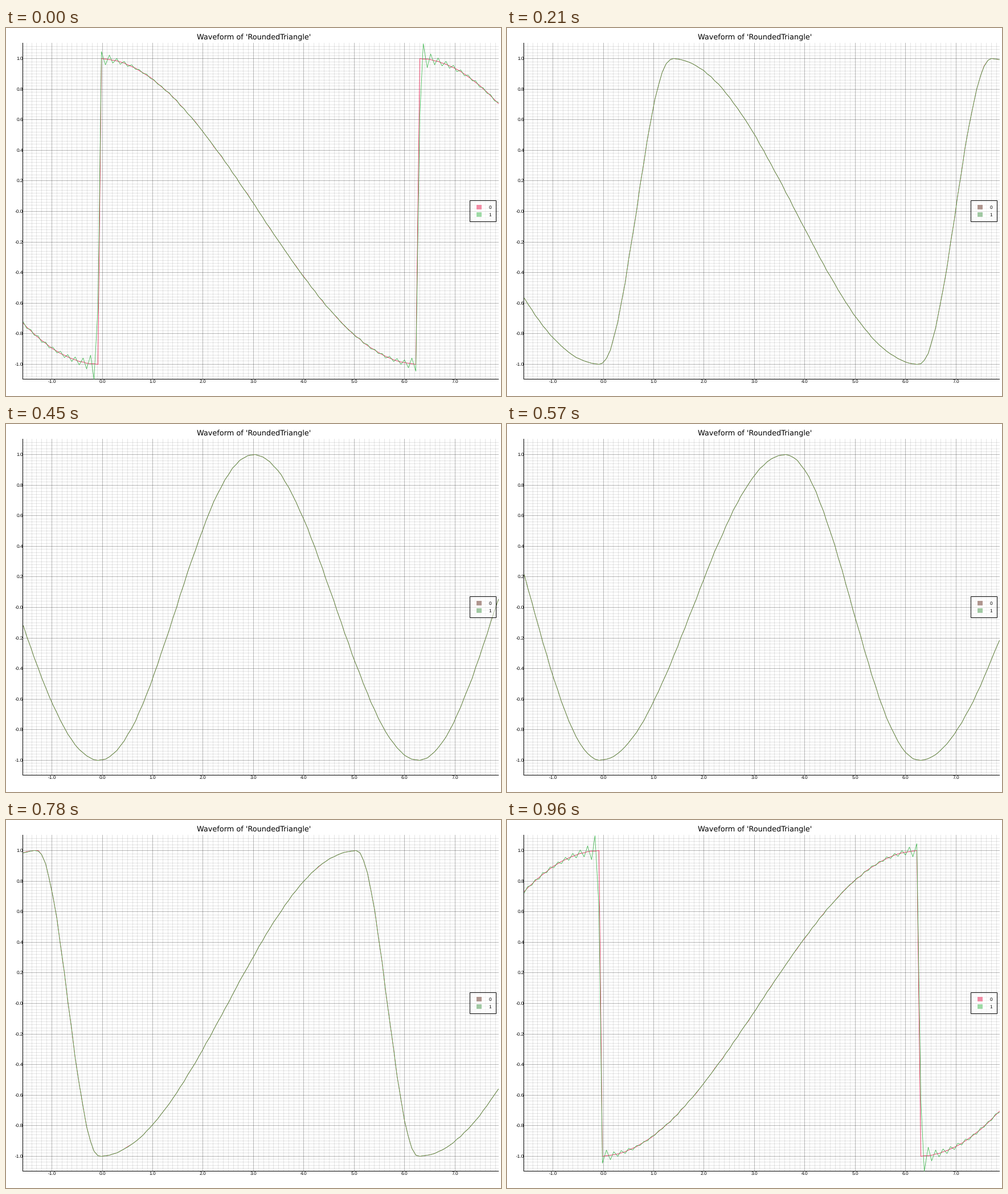
Write a matplotlib script that moves like this. It is 869 px wide and 645 px high and loops after 0.99 s.

```python
import numpy as np
import matplotlib.pyplot as plt
from matplotlib.animation import FuncAnimation
from matplotlib.patches import Rectangle

W, H, DPI = 869, 645, 64
PX = 72 / DPI                       # one pixel in points
LEFT, RIGHT, TOP, BOTTOM = 30, 864, 26, 615
X0, X1, YMAX = -np.pi / 2, 5 * np.pi / 2, 1.1
SAMPLES, HARMONICS, GRID = 128, 42, 4096
STEPS, FRAMES, HOLD = 31, 33, 18    # the step HOLD is shown twice

RED, GREEN = "#e6194b", "#3cb44b"
BRIGHT = ("#f18ca5", "#9ddaa5")
MUTED = ("#b0968f", "#a0c8a2")

plt.rcParams["text.hinting"] = "none"


def px_x(x):
    """Centre of the pixel column for x, rounded towards the left edge."""
    return LEFT + np.floor((RIGHT - LEFT) * (x - X0) / (X1 - X0) + 1e-3) + 0.5


def px_y(y):
    """Centre of the pixel row for y, rounded towards the bottom edge."""
    y = np.clip(y, -YMAX, YMAX)
    return BOTTOM - np.floor((BOTTOM - TOP) * (y + YMAX) / (2 * YMAX) + 1e-3) + 0.5


def wave(theta, peak):
    """Cosine ramps: up from 0 to peak, then down from peak to a full turn."""
    t = np.mod(theta, 2 * np.pi)
    up = -np.cos(np.pi * t / max(peak, 1e-9))
    down = np.cos(np.pi * (t - peak) / max(2 * np.pi - peak, 1e-9))
    return np.where(t < peak, up, down)


def band_limited(theta, peak):
    """Fourier series of the wave, cut after HARMONICS terms."""
    grid = (np.arange(GRID) + 0.5) * 2 * np.pi / GRID
    k = np.arange(HARMONICS + 1)
    coef = np.fft.rfft(wave(grid, peak))[:HARMONICS + 1] / GRID
    coef = coef * np.exp(-1j * k * np.pi / GRID)
    coef[1:] *= 2
    return (np.exp(1j * np.outer(theta, k)) @ coef).real


fig = plt.figure(figsize=(W / DPI, H / DPI), dpi=DPI, facecolor="white")
ax = fig.add_axes([0, 0, 1, 1])
ax.set_xlim(0, W)
ax.set_ylim(H, 0)
ax.axis("off")


def rules(xs, ys, alpha=1.0):
    style = dict(colors="black", lw=PX, alpha=alpha, snap=False, zorder=1)
    ax.vlines(xs, TOP, BOTTOM + 1, **style)
    ax.hlines(ys, LEFT - 1, RIGHT + 1, **style)


def box(x, y, w, h, **style):
    return ax.add_patch(Rectangle((x, y), w, h, snap=False, **style))


def label(x, y, text, size=8.4, ha="center", font="Liberation Sans", z=2):
    ax.text(x, y, text, fontsize=size * PX, family=font, ha=ha,
            va="baseline", color="black", zorder=z)


x_ticks = np.arange(-1, 8)
y_ticks = [k / -5 for k in range(-5, 6)]
rules(px_x(np.arange(-15, 79) / 10), px_y(np.arange(-54, 55) / 50), 0.1)
rules(px_x(x_ticks), px_y(np.array(y_ticks)), 0.2)
rules([LEFT - 0.5], [BOTTOM + 0.5])

label(435, 20, "Waveform of 'RoundedTriangle'", 12.9, font="DejaVu Sans")
for v in x_ticks:
    label(px_x(v), 622, f"{v:.1f}")
for v in y_ticks:
    label(30, px_y(v) + 2.5, f"{v:.1f}", ha="right")

curves = [ax.plot([], [], color=c, lw=0.8 * PX, snap=False, zorder=3,
                  solid_joinstyle="round")[0] for c in (RED, GREEN)]

# Legend
box(814.5, 302.5, 46, 37, fc=(1, 1, 1, 0.5), ec="none", zorder=4)
box(814.5, 302.5, 46, 37, fc="none", ec="black", lw=PX, zorder=5)
swatches = []
for n, y in enumerate((314, 327)):
    swatches.append(box(826, y - 4, 9, 8, lw=0, zorder=5))
    label(850, y + 3.4, str(n), z=5)

index = np.arange(SAMPLES)
plot_x = px_x(np.linspace(X0, X1, SAMPLES))
theta = X0 + (index + 1) * (X1 - X0) / SAMPLES


def draw(frame):
    step = frame if frame <= HOLD else frame - 1
    peak = 2 * np.pi * step / STEPS
    for curve, shape in zip(curves, (wave, band_limited)):
        curve.set_data(plot_x, px_y(shape(theta, peak)))
    tones = BRIGHT if step in (0, STEPS) else MUTED
    for swatch, tone in zip(swatches, tones):
        swatch.set_facecolor(tone)
    return curves + swatches


anim = FuncAnimation(fig, draw, frames=FRAMES, interval=30, repeat=True,
                     repeat_delay=0, blit=False)
plt.show()
```
